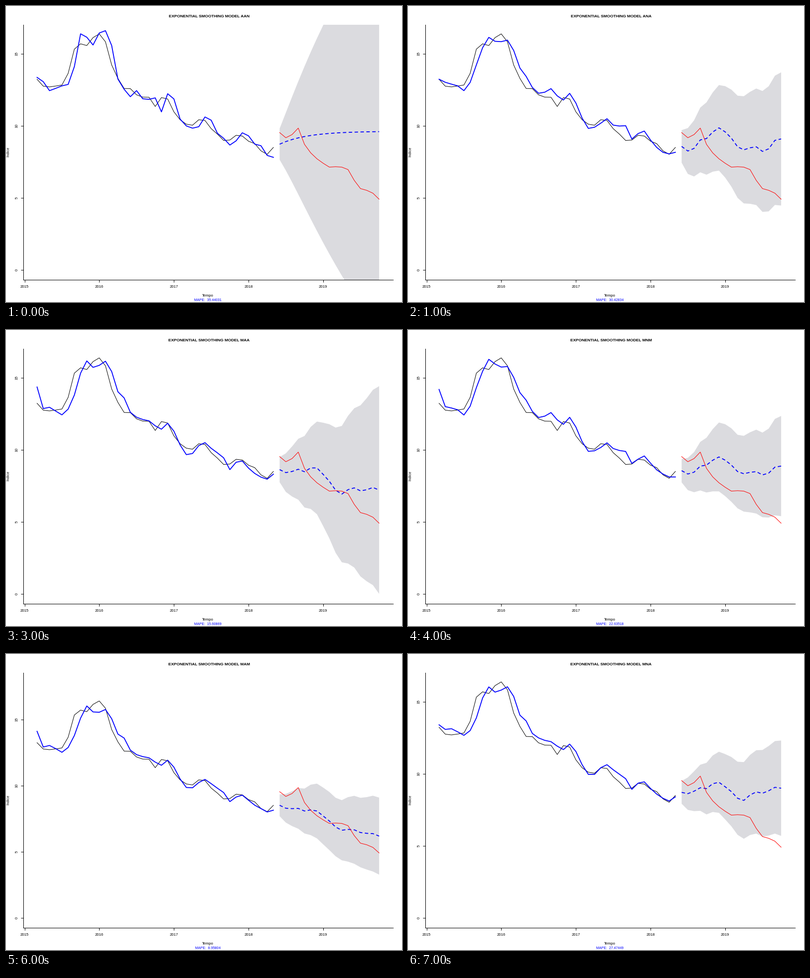
A matplotlib script for the animation above (8000 ms loop, 800 by 600 pixels).

```python
import numpy as np
import matplotlib.pyplot as plt
from matplotlib.animation import FuncAnimation
from matplotlib.patches import Rectangle

plt.rcParams["font.family"] = "Liberation Sans"

PX = 0.72            # points per pixel at 100 dpi
BASE = 534.5         # y of index 0
UNIT = 29.2          # pixels per index point
FIRST = 2            # March, counted from January 2015
AHEAD = 17

# Monthly index: the known part, then what really followed
observed = np.array([
    13.24, 12.76, 12.71, 12.77, 12.84, 13.65, 15.33, 15.7, 15.58, 16.13,
    16.39, 15.84, 14.23, 13.3, 12.6, 12.59, 12.16, 12, 11.99, 11.35,
    11.97, 11.87, 10.98, 10.43, 10.12, 10.05, 10.43, 10.38, 9.81, 9.43,
    8.99, 9.02, 9.35, 9.3, 8.94, 8.77, 8.27, 8.03, 8.51])
later = np.array([
    9.54, 9.18, 9.4, 9.85, 8.72, 8.13, 7.72, 7.41, 7.14, 7.17, 7.14,
    6.97, 6.22, 5.65, 5.53, 5.33, 4.91])

# Seasonal step into each month, January first
FLAT = np.zeros(12)
AUTUMN = np.array([-.20, -.31, -.43, -.15, .10, .05,
                   -.23, .13, .42, .07, .32, .21])
SPRING = np.array([-.31, -.34, -.46, -.15, .38, .21,
                   -.09, .17, .24, -.06, .34, .10])


def month_x(i):
    return 37.6 + 12.565 * np.asarray(i)


def smooth(start, season, slope=0, beta=0, damp=1, ratio_level=None):
    """One-step fits and the forecast of an exponential smoothing model."""
    def step(level, t):
        size = level / ratio_level if ratio_level else 1
        return level + size * season[(FIRST + t) % 12] + damp * slope

    fit = [start]
    for t, value in enumerate(observed, 1):
        slope = damp * slope + beta * (value - fit[-1])
        fit.append(step(value, t))
    mean = [fit.pop()]
    for t in range(len(observed) + 1, len(observed) + AHEAD):
        slope *= damp
        mean.append(step(mean[-1], t))
    return np.array(fit), np.array(mean)


def spread(sd, level, trend=0, damp=1):
    """Forecast deviation by horizon."""
    c = level + trend * np.cumsum(damp ** np.arange(1.0, AHEAD))
    return sd * np.sqrt(1 + np.append(0, np.cumsum(c ** 2)))


def model(name, mape, curves, dev, kind="add", unit=UNIT):
    fit, mean = curves
    if kind == "log":
        up, low = mean * np.exp(0.94 * dev), mean * np.exp(-1.06 * dev)
    else:
        half = dev * mean if kind == "rel" else dev
        up, low = mean + half, mean - half
    return dict(name=name, mape=mape, unit=unit,
                fit=fit, mean=mean, up=up, low=low)


models = [
    model("AAN", 35.44031,
          smooth(13.37, FLAT, slope=-.15, beta=.71, damp=.8),
          spread(1.08, .995, .71, .8)),
    model("ANA", 30.42834, smooth(13.24, 1.4 * AUTUMN), spread(1.13, .992)),
    model("AAA", 21.87452,
          smooth(13.4, 1.3 * AUTUMN, slope=-.08, beta=.05),
          spread(1, 1, .05)),
    model("MAA", 15.60869,
          smooth(14.37, 1.1 * SPRING, slope=-.08, beta=.11),
          spread(.873, 1.05, .11)),
    model("MNM", 22.63518, smooth(14.2, AUTUMN, ratio_level=8.5),
          spread(.095, 1), "rel"),
    model("MMM", 24.22024,
          smooth(14.2, AUTUMN, slope=-.024, ratio_level=8.5),
          spread(.095, 1, .02), "log"),
    model("MAM", 8.95804,
          smooth(14.1, .7 * SPRING, slope=-.155, ratio_level=8),
          spread(.0969, .87, .036), "rel", 26.84),
    model("MNA", 27.47449, smooth(13.41, SPRING), spread(.788, 1.02)),
]

fig = plt.figure(figsize=(8, 6), dpi=100, facecolor="white")
ax = fig.add_axes([0, 0, 1, 1])
ax.set_xlim(0, 800)
ax.set_ylim(599.4, -0.6)
ax.axis("off")


def line(x, y, color="black", width=1, **kw):
    return ax.plot(x, y, color=color, lw=width * PX, **kw)[0]


def label(x, y, text, size=7.8, **kw):
    va = "center" if "rotation" in kw else "center_baseline"
    return ax.text(x, y, text, fontsize=size * PX, ha="center", va=va, **kw)


past_x = month_x(FIRST + np.arange(len(observed)))
next_x = month_x(FIRST + len(observed) + np.arange(AHEAD))

band = ax.fill([0, 1, 1], [0, 0, 1], color="#DBDBDF", lw=0)[0]
band.set_clip_path(Rectangle((35, 37), 747, 517, transform=ax.transData))
seen = line(past_x, observed)
fitted = line(past_x, observed, "blue", 1.8)
ahead = line(next_x, later, "blue", 1.8, dashes=(3.8, 2.8),
             dash_capstyle="butt")
actual = line(next_x, later, "red")

# Axes
line([35, 35], [37, 554])
line([35, 782], [554, 554])
for k in range(5):
    x = month_x(12 * k)
    line([x, x], [554, 559], solid_capstyle="butt")
    label(x, 568, str(2015 + k))
ticks = []
for v in (0, 5, 10, 15):
    ticks.append((v, line([30, 35], [BASE, BASE], solid_capstyle="butt"),
                  label(22, BASE, str(v), rotation=90)))
label(5, 295, "Indice", 7.6, rotation=90)
label(408, 586, "Tempo")
title = label(410.5, 19.5, "", 8.3, weight="bold")
score = label(407.5, 595, "", 7, color="blue")


def draw(i):
    m = models[i]

    def level(v):
        return BASE - v * m["unit"]

    seen.set_ydata(level(observed))
    actual.set_ydata(level(later))
    fitted.set_ydata(level(m["fit"]))
    ahead.set_ydata(level(m["mean"]))
    edge = np.append(m["up"], m["low"][::-1])
    band.set_xy(np.column_stack([np.append(next_x, next_x[::-1]),
                                 level(edge)]))
    for v, tick, text in ticks:
        tick.set_ydata([level(v)] * 2)
        text.set_y(level(v))
    title.set_text("EXPONENTIAL SMOOTHING MODEL " + m["name"])
    score.set_text(f"MAPE:  {m['mape']:.5f}")
    return []


anim = FuncAnimation(fig, draw, frames=len(models), interval=1000,
                     repeat=True, blit=False)
plt.show()
```
